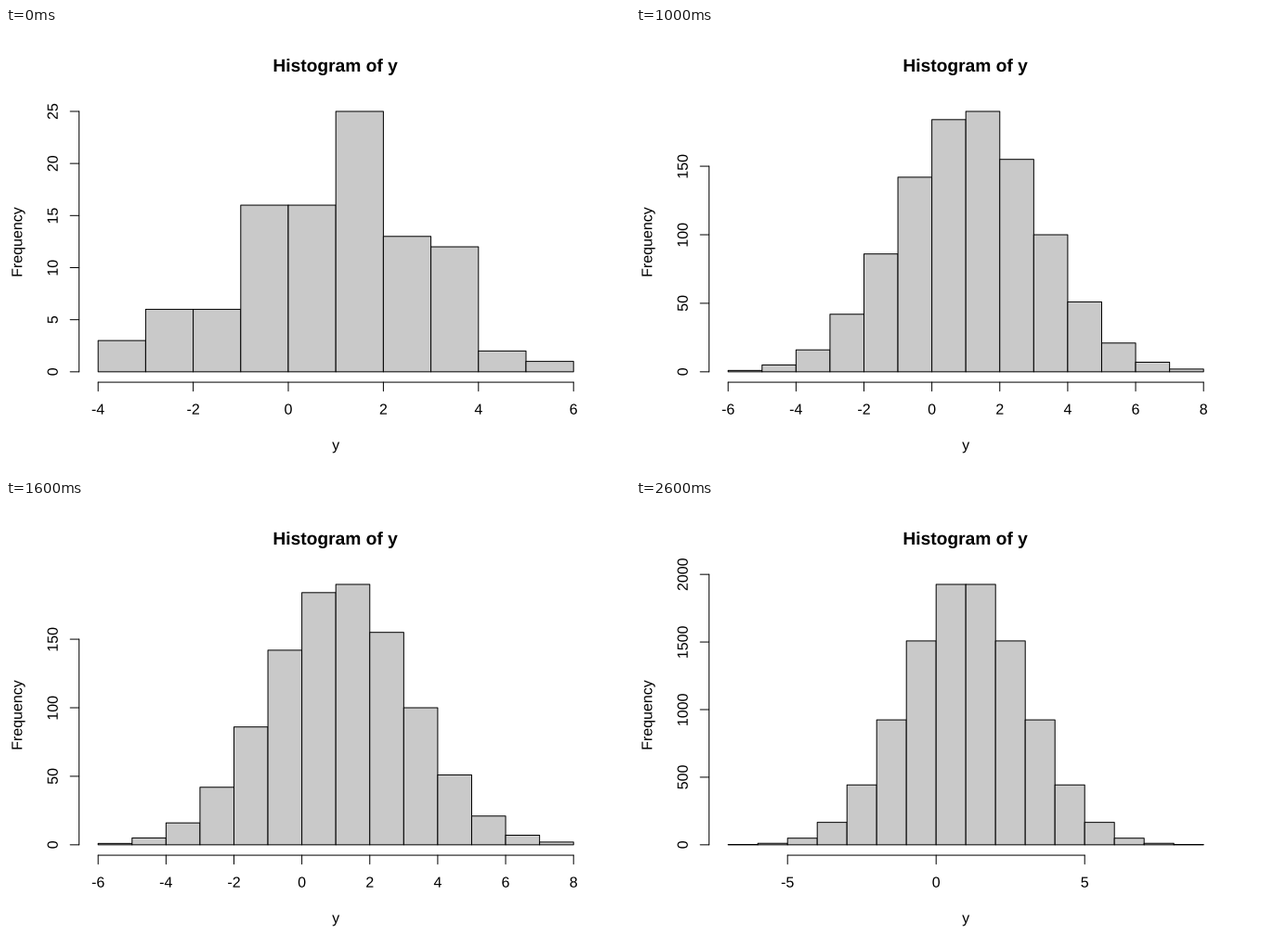
A matplotlib script that plays this animation: 672x480 px, repeating every 3 s.

```python
import math

import matplotlib.pyplot as plt
from matplotlib.animation import FuncAnimation
from matplotlib.patches import PathPatch, Rectangle
from matplotlib.textpath import TextPath
from matplotlib.transforms import Affine2D

W, H, DPI = 672, 480, 96
PX = 72 / DPI  # points per pixel
LINE = 19.2  # one margin line in pixels

# Plot region, then the span of the data inside it
LEFT, RIGHT, TOP, BOTTOM = 4.1 * LINE, W - 2.1 * LINE, 4.1 * LINE, H - 5.1 * LINE
PAD_X = (RIGHT - LEFT) * 0.04 / 1.08
PAD_Y = (BOTTOM - TOP) * 0.04 / 1.08
X0, X1 = LEFT + PAD_X, RIGHT - PAD_X
Y0, Y1 = BOTTOM - PAD_Y, TOP + PAD_Y


def bell(start, stop, mean, sd, peak):
    """Unit-bin counts of a normal sample whose tallest bin holds peak."""
    def cdf(x):
        return math.erf((x - mean) / (sd * math.sqrt(2)))

    share = [cdf(x + 1) - cdf(x) for x in range(start, stop)]
    return [round(peak * s / max(share)) for s in share]


# First break and bin counts; the small sample is too rough for a curve
HISTS = [
    (-4, [3, 6, 6, 16, 16, 25, 13, 12, 2, 1]),
    (-6, bell(-6, 8, mean=1.13, sd=2.05, peak=190)),
    (-7, bell(-7, 9, mean=1, sd=2, peak=1926)),
]

fig = plt.figure(figsize=(W / DPI, H / DPI), dpi=DPI, facecolor="white")
ax = fig.add_axes([0, 0, 1, 1])


def ticks(low, high):
    """Multiples of a round step inside the range widened by 4%."""
    pad = 0.04 * (high - low)
    raw = (high - low + 2 * pad) / 5
    base = 10 ** math.floor(math.log10(raw))
    step = base * min((1, 2, 5, 10), key=lambda m: abs(math.log(m * base / raw)))
    first, last = math.ceil((low - pad) / step), math.floor((high + pad) / step)
    return [k * step for k in range(first, last + 1)]


def line(xa, ya, xb, yb):
    ax.plot([xa, xb], [ya, yb], color="black", lw=PX,
            solid_capstyle="round", snap=False)


def label(x, y, text, size=16, angle=0, weight="normal"):
    """Text centred on x (or on y when turned), placed to subpixels."""
    font = {"family": "Liberation Sans", "weight": weight}
    path = TextPath((0, 0), text, size=size, prop=font)
    box = path.get_extents()
    place = (Affine2D().translate(-(box.x0 + box.x1) / 2, 0).scale(1, -1)
             .rotate_deg(-angle).translate(x, y))
    ax.add_patch(PathPatch(path.transformed(place), facecolor="black", lw=0,
                           snap=False))


def draw(i):
    start, counts = HISTS[i % len(HISTS)]
    ax.clear()
    ax.set_xlim(0, W)
    ax.set_ylim(H, 0)
    ax.axis("off")

    def px(v):
        return X0 + (v - start) * (X1 - X0) / len(counts)

    def py(v):
        return Y0 + v * (Y1 - Y0) / max(counts)

    for k, n in enumerate(counts, start):
        ax.add_patch(Rectangle((px(k), py(n)), px(k + 1) - px(k), py(0) - py(n),
                               facecolor="#c9c9c9", edgecolor="black", lw=PX,
                               joinstyle="round", snap=False))

    xticks = ticks(start, start + len(counts))
    line(px(xticks[0]), BOTTOM, px(xticks[-1]), BOTTOM)
    for v in xticks:
        line(px(v), BOTTOM, px(v), BOTTOM + LINE / 2)
        label(px(v), BOTTOM + 1.8 * LINE, str(v))

    yticks = ticks(0, max(counts))
    line(LEFT, py(yticks[0]), LEFT, py(yticks[-1]))
    for v in yticks:
        line(LEFT, py(v), LEFT - LINE / 2, py(v))
        label(LEFT - 1.2 * LINE, py(v), str(v), angle=90)

    mid_x, mid_y = (LEFT + RIGHT) / 2, (TOP + BOTTOM) / 2
    label(mid_x, 47, "Histogram of y", LINE, weight="bold")
    label(mid_x, BOTTOM + 3.8 * LINE, "y")
    label(LEFT - 3.2 * LINE, mid_y, "Frequency", angle=90)
    return []


anim = FuncAnimation(fig, draw, frames=len(HISTS), interval=1000,
                     init_func=lambda: draw(0), repeat=True, repeat_delay=0)
plt.show()
```
